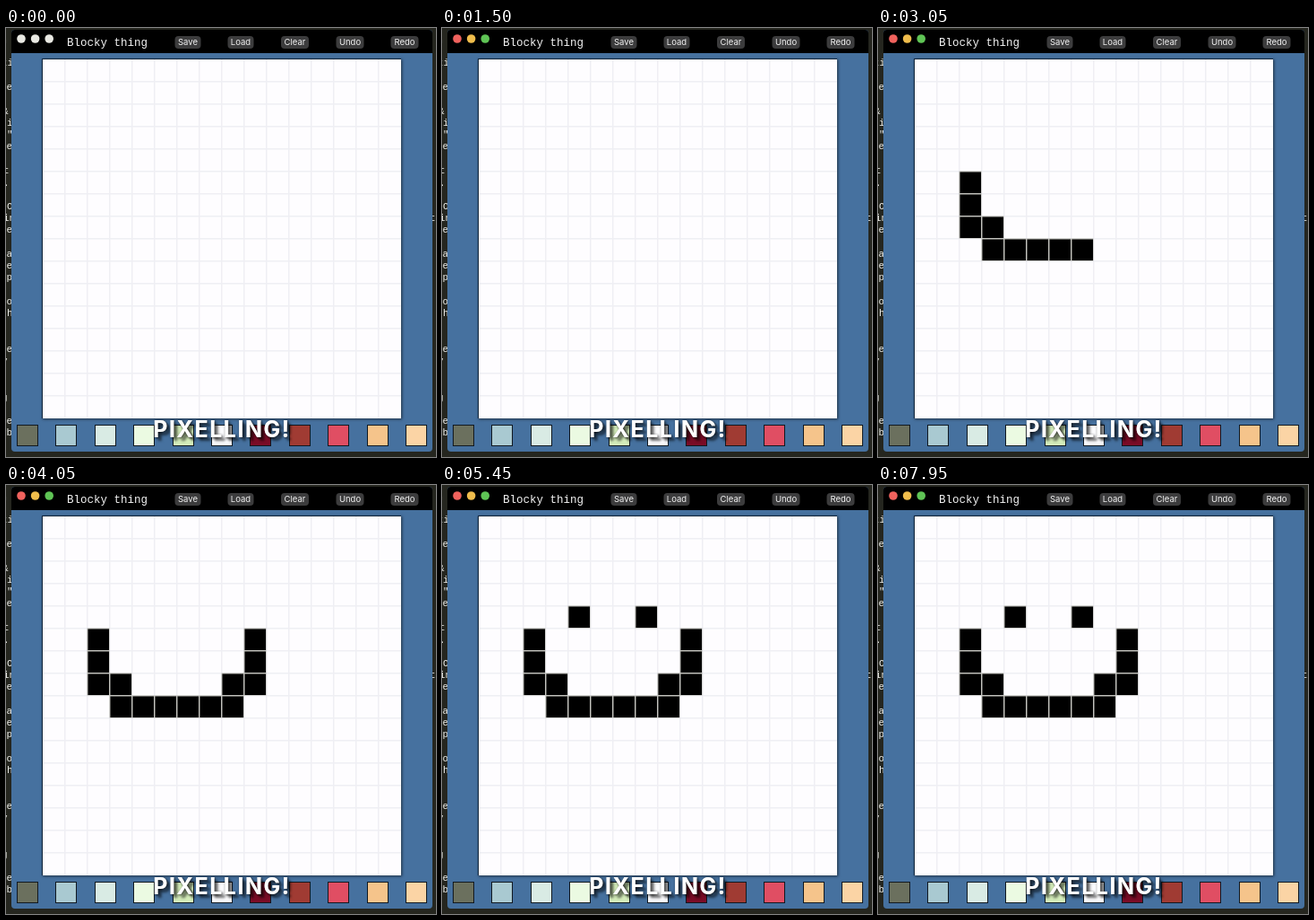
Recreate the animation shown at these times as an HTML page with a canvas. Size 480 px wide and 478 px high, loop 8000 ms.

```html
<!DOCTYPE html>
<html lang="en">
<head>
<meta charset="utf-8">
<title>Pixel editor</title>
<style>
  html, body { margin: 0; width: 100%; height: 100%; overflow: hidden; background: #25261f; }
  canvas { display: block; }
</style>
</head>
<body>
<canvas id="stage" width="480" height="478"></canvas>
<script>
const ctx = document.getElementById('stage').getContext('2d');
const LOOP = 8000, FOCUS_TIME = 1400;
const CELL = 25, LEFT = 41, TOP = 35, SIZE = 400;
const MONO = '"Liberation Mono", monospace';

const swatches = ['#6b705e', '#a9c9d1', '#d9ebe4', '#ebfae2', '#d4edba', '#fbfbfd',
  '#7a0c26', '#a03b33', '#e04e63', '#f5c48b', '#fbd4a5'];
const buttons = [['Save', 203], ['Load', 262], ['Clear', 322.5], ['Undo', 384], ['Redo', 445]];

// Terminal text peeking out behind the window: text, x, baseline
const terminal = [['m', -6, 17], ['ti', -5, 42], ['te', -6, 69], ['&', -4, 96], ['i', 1, 109],
  ['"', 1, 122], ['se', -6, 135], ['t', -3, 162], ['.', -3, 176], ['O', 1, 202],
  ['in', -3, 215], ['be', -6, 228], ['Ca', -6, 255], ['se', -6, 268], ['pp', -6, 281],
  ['no', -6, 308], ['h', 1, 321], ['se', -6, 361], ['y', -5, 374], ['g', -5, 415],
  ['me', -6, 441], ['yb', -6, 454], ['te', 473, 215]];

// Painted cells in drawing order: column, row, time
const cells = [[2, 5], [2, 6], [2, 7], [3, 7], [3, 8], [4, 8], [5, 8], [6, 8], [7, 8], [8, 8],
  [8, 7], [9, 7], [9, 6], [9, 5]].map(([col, row], i) =>
  [col, row, i < 3 ? 1640 + i * 180 : 2000 + (i - 2) * 165]);
cells.push([4, 4, 4500], [7, 4, 5000]);

function rect(x, y, w, h, color) {
  ctx.fillStyle = color;
  ctx.fillRect(x, y, w, h);
}

function text(string, x, y, font, color, align = 'left') {
  ctx.font = font;
  ctx.fillStyle = color;
  ctx.textAlign = align;
  ctx.fillText(string, x, y);
}

function rounded(x, y, w, h, radius, color) {
  ctx.fillStyle = color;
  ctx.beginPath();
  ctx.roundRect(x, y, w, h, radius);
  ctx.fill();
}

function shadow(color, blur, x, y) {
  ctx.shadowColor = color;
  ctx.shadowBlur = blur;
  ctx.shadowOffsetX = x;
  ctx.shadowOffsetY = y;
}

function drawWindow(focused) {
  rect(0, 0, 480, 478, '#25261f');
  for (const [string, x, y] of terminal) text(string, x, y, '11px ' + MONO, '#eeeeea');
  rounded(6, 2, 470, 470, 4, '#46719f');
  rounded(6, 2, 470, 26, [4, 4, 0, 0], '#000');

  const lights = focused ? ['#f0625d', '#f0bd4c', '#5fc455'] : Array(3).fill('#e9e9e3');
  lights.forEach((color, i) => rounded(12.2 + i * 15.6, 7.2, 9.6, 9.6, 4.8, color));

  text('Blocky thing', 68, 20, '12.5px ' + MONO, '#f4f4f4');
  for (const [label, x] of buttons) {
    const w = label.length > 4 || x > 380 ? 31 : 29;
    rounded(x - w / 2, 9, w, 14, 4, '#3c3c3d');
    text(label, x, 19.3, '9.5px Inter, sans-serif', '#f0f0f0', 'center');
  }
}

function drawBoard(time) {
  shadow('rgba(0,0,0,.6)', 3, 1, 1);
  rect(LEFT - 1, TOP - 1, SIZE + 1, SIZE + 1, '#10243a');
  shadow('transparent', 0, 0, 0);
  rect(LEFT, TOP, SIZE, SIZE, '#fefdff');
  for (let i = 1; i < 16; i++) {
    rect(LEFT + i * CELL - 1, TOP, 1.5, SIZE, '#efeff4');
    rect(LEFT, TOP + i * CELL - 1, SIZE, 1.5, '#efeff4');
  }
  for (const [col, row, start] of cells) {
    if (time < start) continue;
    const x = LEFT + col * CELL, y = TOP + row * CELL;
    rect(x - 0.5, y - 0.5, CELL, CELL, '#b5b5ae');
    rect(x + 0.5, y + 0.5, CELL - 1.5, CELL - 1.5, '#000');
  }
}

function drawPalette() {
  swatches.forEach((color, i) => {
    const x = Math.round(12 + i * 43.4);
    rect(x, 442, 24, 24, '#101820');
    rect(x + 1, 443, 22, 22, color);
  });
}

function drawCaption() {
  const font = '700 25px Inter, sans-serif';
  ctx.letterSpacing = '1.5px';
  shadow('rgba(0,0,0,.55)', 3, 4, 4);
  text('PIXELLING!', 241, 456, font, '#fff', 'center');
  shadow('rgba(0,0,0,.85)', 3, 1, 1);
  text('PIXELLING!', 241, 456, font, '#fff', 'center');
  shadow('transparent', 0, 0, 0);
  ctx.letterSpacing = '0px';
}

function frame() {
  const time = performance.now() % LOOP;
  drawWindow(time >= FOCUS_TIME);
  drawBoard(time);
  drawPalette();
  drawCaption();
  requestAnimationFrame(frame);
}
frame();
</script>
</body>
</html>
```
